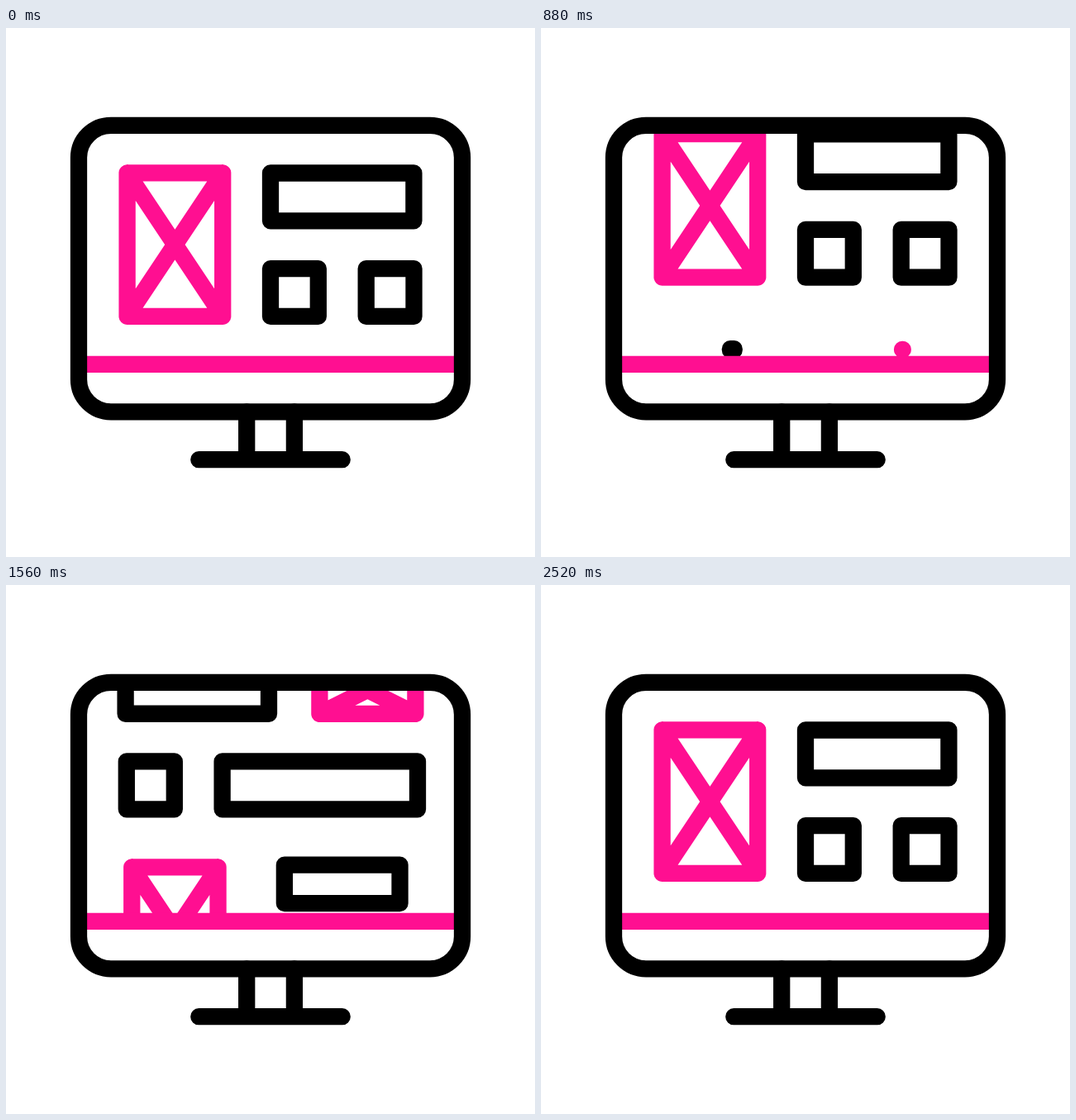
Write an HTML page that moves like this. It is 640x640 px and loops after 3 s.

```html
<!DOCTYPE html>
<html lang="en">
<head>
<meta charset="utf-8">
<title>Scrolling wireframe</title>
<style>
  html, body { margin: 0; width: 100%; height: 100%; overflow: hidden; background: #fff; }
  svg { display: block; width: 100vw; height: 100vh; }
  path, rect { fill: none; stroke: #000; stroke-width: 20.3; stroke-linecap: round; stroke-linejoin: round; }
  .accent { stroke: #ff0f91; }
</style>
</head>
<body>
<svg viewBox="0 0 640 640">
  <clipPath id="screen"><path d="M88 118H552V407H88Z"/></clipPath>
  <g clip-path="url(#screen)"><g id="page"></g></g>
  <path class="accent" d="M98 406.9H542" style="stroke-linecap: butt"/>
  <rect x="88" y="117.8" width="464" height="346.5" rx="39"/>
  <path d="M291.2 464.5V522.2M348.9 464.5V522.2M233.3 522.2H406.7"/>
</svg>
<script>
const LOOP = 3000, TICK = 40;
const SCROLL = { start: 280, length: 2240, distance: 466.8 };
const POP = 480;

// Blocks of the page: centre x, centre y, width, height, crossed, pop start
const hero = [
  [204.4, 262.1, 115.6, 173.4, true],
  [406.7, 204.4, 173.4, 57.8, false],
  [348.9, 320, 57.8, 57.8, false],
  [464.6, 320, 57.8, 57.8, false]
];
const blocks = [
  ...hero.map(b => [...b, -POP]),
  [231.3, 436.2, 173.4, 57.8, false, 807],
  [437.4, 436.2, 116, 58, true, 847],
  [174.8, 551.7, 58, 58, false, 927],
  [379.8, 551.7, 236.4, 58, false, 967],
  ...hero.map(([x, y, ...rest], i) => [x, y + SCROLL.distance, ...rest, 1207 + i * 40])
];

const page = document.getElementById('page');
const paths = blocks.map(block => {
  const path = document.createElementNS('http://www.w3.org/2000/svg', 'path');
  if (block[4]) path.setAttribute('class', 'accent');
  return page.appendChild(path);
});

// cubic-bezier(.58, 0, .42, 1)
function ease(x) {
  if (x <= 0) return 0;
  if (x >= 1) return 1;
  let lo = 0, hi = 1;
  for (let i = 0; i < 30; i++) {
    const s = (lo + hi) / 2;
    const bx = s * s * (3 - 2 * s) + 1.74 * s * (1 - s) * (1 - 2 * s);
    if (bx < x) lo = s; else hi = s;
  }
  return lo * lo * (3 - 2 * lo);
}

function outline(x, y, w, h, crossed) {
  const l = x - w / 2, r = x + w / 2, t = y - h / 2, b = y + h / 2;
  const box = `M${l} ${t}H${r}V${b}H${l}Z`;
  return crossed ? `${box}M${l} ${t}L${r} ${b}M${r} ${t}L${l} ${b}` : box;
}

function draw(t) {
  const shift = SCROLL.distance * ease((t - SCROLL.start) / SCROLL.length);
  page.setAttribute('transform', `translate(0 ${-shift})`);
  blocks.forEach(([x, y, w, h, crossed, start], i) => {
    const k = ease((t - start) / POP);
    paths[i].setAttribute('d', k ? outline(x, y, w * k, h * k, crossed) : '');
  });
}

const begin = performance.now();
function run() {
  const t = (performance.now() - begin) % LOOP;
  draw(Math.floor(t / TICK) * TICK);
  requestAnimationFrame(run);
}
run();
</script>
</body>
</html>
```
